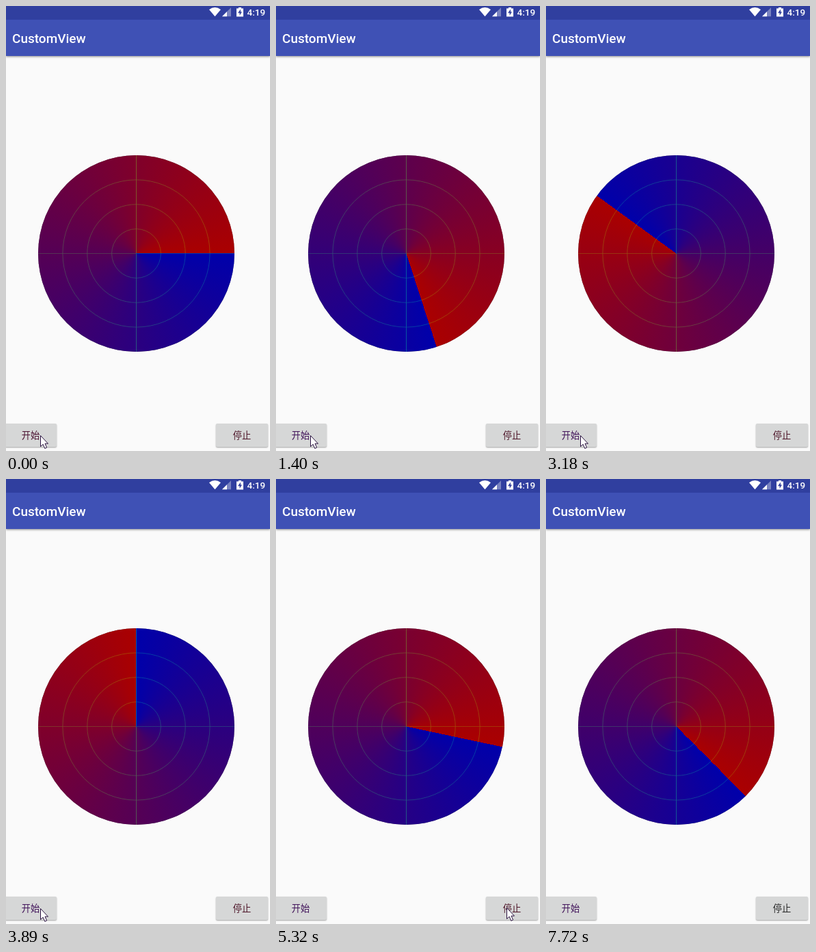
Write an HTML page that moves like this. It is 386 px wide and 650 px high and loops after 8120 ms.

```html
<!DOCTYPE html>
<html lang="zh">
<head>
<meta charset="utf-8">
<title>CustomView</title>
<style>
  html, body { margin: 0; width: 100%; height: 100%; overflow: hidden; background: #fafafa; }
  body > * { position: absolute; }
  svg { left: 0; top: 0; }
  .bar { left: 0; top: 0; width: 386px; height: 73px; background: linear-gradient(#303f9f 20px, #3f51b5 20px);
         box-shadow: 0 1px 3px rgba(0,0,0,.45); }
  .bar + svg text { font-family: Roboto, sans-serif; font-weight: 500; fill: #fff; }
  .sweep { left: 47px; top: 218px; width: 287px; height: 287px; border-radius: 50%;
           background: conic-gradient(from calc(90deg + var(--angle, 0deg)), #00fa, #f00a); }
  .button { top: 610px; width: 76px; height: 34px; border-radius: 2px; background: #d6d7d7;
            box-shadow: 0 1px 2px rgba(0,0,0,.35); text-align: center; overflow: hidden;
            font: 13.3px/34px "Noto Sans CJK SC", "Noto Sans CJK", sans-serif; }
</style>
</head>
<body>
<div class="bar"></div>
<svg width="386" height="650">
  <text x="9" y="54" font-size="19">CustomView</text>
  <text x="352.5" y="14.3" font-size="13.5">4:19</text>
  <g fill="#fff">
    <path d="M297 5.2Q305.5-1.2 314 5.2L305.5 15.3Z"/>
    <path d="M316 15.3L329 2.3V15.3Z" opacity=".35"/>
    <path d="M316 15.3L323 8.3V15.3Z"/>
    <path d="M340 2h4v1.5h3v12h-10v-12h3Z"/>
  </g>
  <path d="M343 4.8L339 10.2H341.6V14L345 8.6H343Z" fill="#303f9f"/>
  <circle cx="190.5" cy="361.5" r="143.5"/>
  <g fill="none" stroke="#0f0">
    <path d="M190.5 218V505"/>
    <path d="M47 361.5H334" opacity=".6"/>
    <g opacity=".7">
      <circle cx="190.5" cy="361.5" r="35.9"/>
      <circle cx="190.5" cy="361.5" r="71.75"/>
      <circle cx="190.5" cy="361.5" r="107.6"/>
    </g>
  </g>
</svg>
<div class="sweep"></div>
<div class="button" id="start" style="left:-2px">开始</div>
<div class="button" id="stop" style="left:307px">停止</div>
<svg width="386" height="650">
  <path id="cursor" d="M.5.5V16.5L4.2 13.2L6.8 19.3L9.6 18L7 12.2H11.5Z" fill="#fff" stroke="#2a1240"/>
</svg>
<script>
const LOOP = 8120, TICK = 77.8;
// [tick, degrees] of the sweep
const SWEEP = [[-1, 0], [12, 72], [23, 132], [35, 216], [53, 321], [67.5, 405]];
const [sweep, start, stop, cursor] = ['.sweep', '#start', '#stop', '#cursor'].map(s => document.querySelector(s));

const clamp = x => Math.min(1, Math.max(0, x));
const smooth = x => x * x * (3 - 2 * x);

function sweepAngle(tick) {
  let angle = 0;
  for (let i = 1; i < SWEEP.length; i++) {
    const [k0, a0] = SWEEP[i - 1], [k1, a1] = SWEEP[i];
    angle += (a1 - a0) * clamp((tick - k0) / (k1 - k0));
  }
  return Math.round(angle / 3) * 3;
}

function ripple(button, x, age) {
  const alpha = age > 0 && age < 1 ? .09 * Math.sin(Math.PI * age) : 0;
  const radius = 10 + 70 * clamp(age * 2);
  button.style.backgroundImage =
    `radial-gradient(circle at ${x}px 18px, rgba(0,0,0,${alpha}) ${radius}px, transparent ${radius + 1}px)`;
}

function draw(now) {
  const t = now % LOOP;
  const tick = Math.floor((t - 450) / TICK);
  const captured = 467 + tick * TICK;

  sweep.style.setProperty('--angle', sweepAngle(tick) + 'deg');
  ripple(start, 52, (captured - 120) / 500);
  ripple(stop, 31, (captured - 5570) / 500);
  start.style.color = t < 470 ? '#4a1030' : '#3f1058';
  stop.style.color = t < 5620 ? '#4a1024' : '#222';

  const p = smooth(clamp((captured - 4490) / 460));
  const exit = t < 7580 ? 0 : t < 7650 ? 8 : t < 7720 ? 17 : 40;
  const x = 50 + 287 * p, y = 627 - p + 6 * Math.sin(Math.PI * p) + exit;
  cursor.setAttribute('transform', `translate(${Math.round(x)} ${Math.round(y)})`);
}

function frame() {
  draw(performance.now());
  requestAnimationFrame(frame);
}
frame();
</script>
</body>
</html>
```
